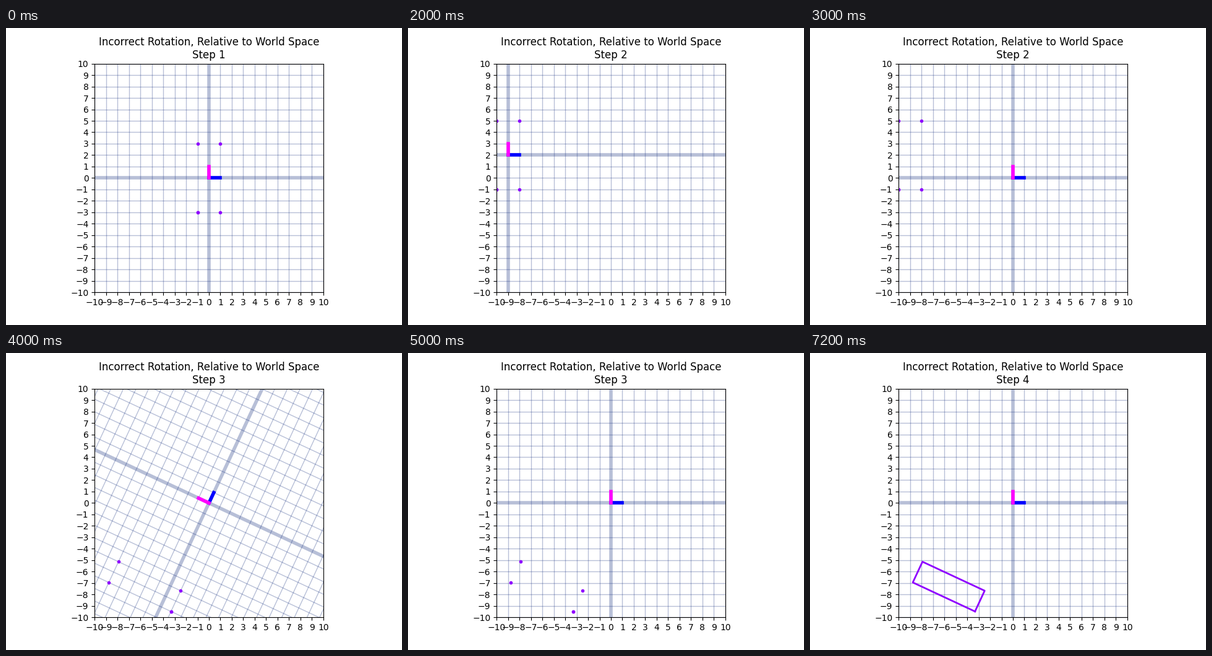
These frames come from a looping animation (640 by 480 pixels, 8 s). A matplotlib script:

```python
import numpy as np
import matplotlib.pyplot as plt
from matplotlib.animation import FuncAnimation

GRID = (0.07, 0.175, 0.49)
VIOLET = "#8f00ff"
REACH = 40
ANGLE = np.radians(65)
SHIFT = np.array([-9, 2])
TURN = np.array([[np.cos(ANGLE), -np.sin(ANGLE)],
                 [np.sin(ANGLE), np.cos(ANGLE)]])
STILL = np.eye(2)
ORIGIN = np.zeros(2)

box = np.array([(-1, -3), (1, -3), (1, 3), (-1, 3), (-1, -3)])
moved = box + SHIFT
turned = moved @ TURN.T

# step number, grid origin, grid basis, corners, outlined
SCENES = [
    (1, ORIGIN, STILL, box, False),
    (2, SHIFT, STILL, moved, False),
    (2, ORIGIN, STILL, moved, False),
    (3, ORIGIN, TURN, turned, False),
    (3, ORIGIN, STILL, turned, False),
    (4, ORIGIN, STILL, turned, True),
]
TIMELINE = [0, 0, 1, 2, 3, 4, 5, 5]  # one entry per second

fig, ax = plt.subplots(figsize=(6.4, 4.8), dpi=100)


def segment(start, end, origin, basis, **style):
    pts = np.array([start, end]) @ basis.T + origin
    ax.plot(pts[:, 0], pts[:, 1], **style)


def draw_grid(origin, basis):
    for k in range(-REACH, REACH + 1):
        style = dict(color=GRID, alpha=0.3, lw=1 if k else 4)
        segment((k, -REACH), (k, REACH), origin, basis, **style)
        segment((-REACH, k), (REACH, k), origin, basis, **style)
    segment((0, 0), (1, 0), origin, basis, color="blue", lw=4)
    segment((0, 0), (0, 1), origin, basis, color="magenta", lw=4)


def draw(i):
    step, origin, basis, corners, outlined = SCENES[TIMELINE[i]]
    ax.clear()
    ax.set_aspect("equal")
    draw_grid(origin, basis)
    if outlined:
        ax.plot(*corners.T, color=VIOLET, lw=2)
    else:
        ax.plot(*corners.T, ".", color=VIOLET)
    ax.set(xlim=(-10, 10), ylim=(-10, 10),
           xticks=range(-10, 11), yticks=range(-10, 11))
    ax.set_title(f"Incorrect Rotation, Relative to World Space\nStep {step}")


anim = FuncAnimation(fig, draw, frames=len(TIMELINE), interval=1000,
                     init_func=lambda: None, repeat=True, repeat_delay=0)
plt.show()
```
